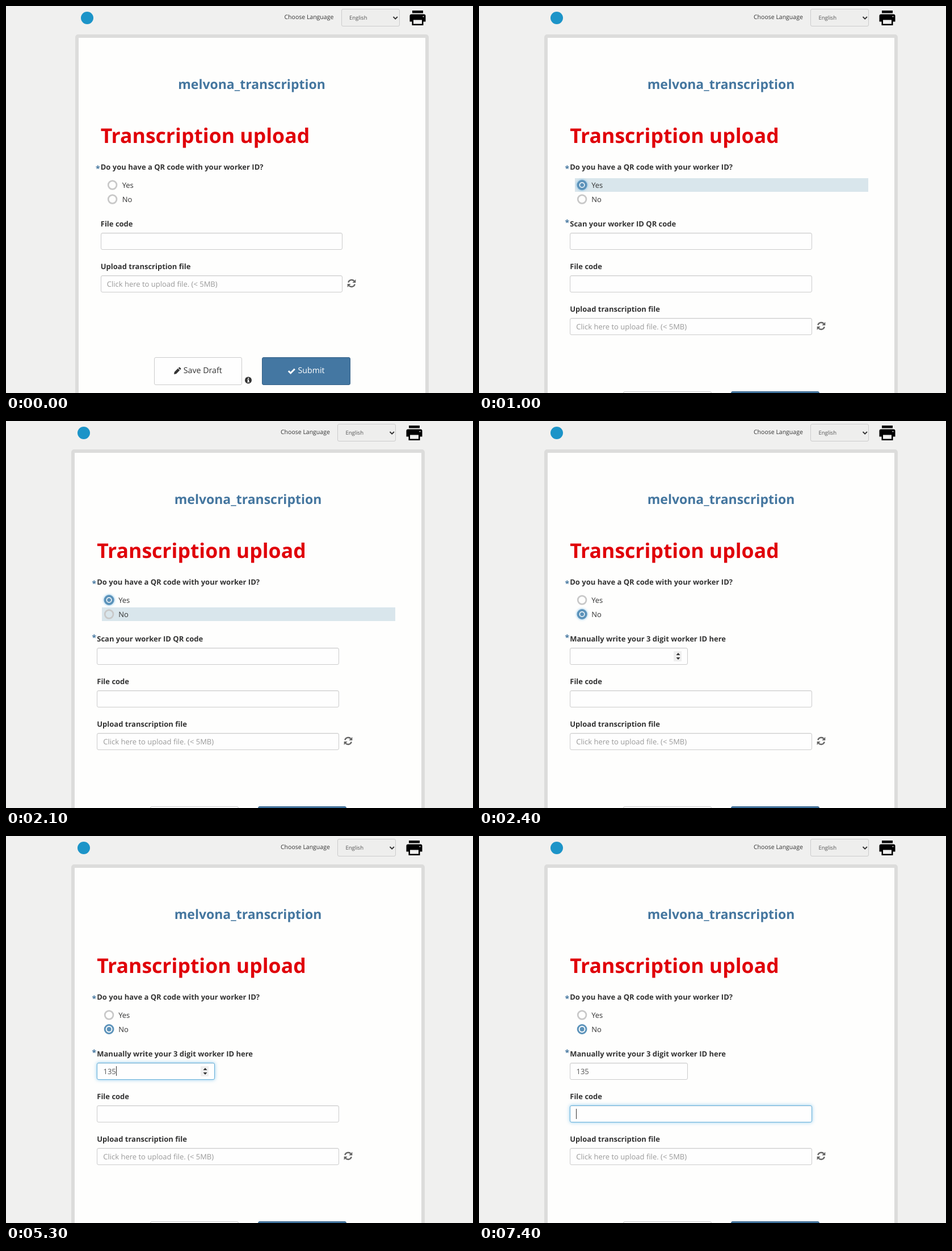
Write an HTML page that moves like this. It is 823 px wide and 681 px high and loops after 8 s.

```html
<!DOCTYPE html>
<html lang="en">
<head>
<meta charset="utf-8">
<title>Transcription upload</title>
<style>
  html, body { margin: 0; width: 100%; height: 100%; overflow: hidden; background: #f0f0ef; }
  body { position: relative; font-family: "Open Sans", sans-serif; color: #333; text-rendering: geometricPrecision; }
  div, span, svg { position: absolute; box-sizing: border-box; }
  #stage, .group { left: 0; top: 0; width: 823px; height: 681px; }
  span { white-space: pre; line-height: normal; }
  svg { left: 0; top: 0; overflow: visible; }
  .card { border: 6px solid #dcdcdb; border-radius: 5px; background: #fefefd; }
  .select { border: 1px solid #ccc; border-radius: 3px; background: #eeeeed; }
  .field {
    --f: 0;
    border: 1px solid color-mix(in srgb, #66afd9 calc(var(--f) * 100%), #ccc);
    border-radius: 3px; background: #fefefe;
    box-shadow: inset 0 1px 1px rgb(0 0 0 / .06), 0 0 6px rgb(82 175 230 / calc(var(--f) * .65));
  }
  .save { border: 1px solid #ccc; border-radius: 3px; background: #fefefe; }
  .submit { border: 1px solid #356187; border-radius: 3px; background: #4477a2; }
  .row { background: #d9e6ec; }
  .caret { background: #333; }
  .spin { background: #efefef; }
</style>
</head>
<body>
<div id="stage"></div>
<script>
const LOOP = 8000, LEFT = 166.75, WIDE = 426.5, BLUE = '#44769f', RADIO = '#5c93ba';
const stage = document.getElementById('stage');

function add(parent, tag, cls, style = {}) {
  const el = document.createElement(tag);
  el.className = cls;
  Object.assign(el.style, style);
  return parent.appendChild(el);
}
const group = parent => add(parent, 'div', 'group');
const box = (parent, cls, x, y, w, h) =>
  add(parent, 'div', cls, { left: x + 'px', top: y + 'px', width: w + 'px', height: h + 'px' });

// Places text by its baseline.
function text(parent, x, baseline, size, str, style = {}) {
  const el = add(parent, 'span', '', {
    left: x + 'px', top: baseline - Math.round(size * 1.069) + 'px', fontSize: size + 'px', ...style });
  el.textContent = str;
  return el;
}
const label = (parent, baseline, str) => text(parent, LEFT, baseline, 13, str, { fontWeight: 700 });
const star = (parent, baseline) => text(parent, 158, baseline, 14, '*', { fontWeight: 700, color: BLUE });
const field = (parent, y, w = WIDE) => box(parent, 'field', LEFT, y, w, 30);

function art(parent, markup) {
  const holder = group(parent);
  holder.innerHTML = `<svg width="823" height="681">${markup}</svg>`;
  return holder;
}
const show = (el, on) => { el.style.visibility = on ? 'inherit' : 'hidden'; };

// Header
art(stage, `
  <circle cx="143" cy="21" r="11" fill="#1c94c8"/>`);
text(stage, 490.5, 24, 10.5, 'Choose Language');
box(stage, 'select', 590.75, 5, 103, 31);
text(stage, 605, 24, 9.5, 'English', { color: '#555' });
art(stage, `
  <path d="M682.5 19l3.7 3.7 3.7-3.7" fill="none" stroke="#333" stroke-width="1.8"/>
  <path d="M716 8h19v4.5h-19z M714 14.5h22.500a3 3 0 0 1 3 3v10h-4v6.500h-20v-6.500h-4v-10a3 3 0 0 1 3-3z" fill="#000"/>
  <path d="M718 24.500h15v7h-15z" fill="#f0f0ef"/>
  <circle cx="735.5" cy="18.500" r="1" fill="#f0f0ef"/>`);

// Form
box(stage, 'card', 121.75, 50, 623, 700);
text(stage, 133, 146, 23, 'melvona_transcription',
  { width: '600px', textAlign: 'center', fontWeight: 700, color: BLUE });
text(stage, LEFT, 242, 35.6, 'Transcription upload', { fontWeight: 700, color: '#e00009' });
star(stage, 292);
label(stage, 288, 'Do you have a QR code with your worker ID?');

function option(name, y) {
  const row = box(stage, 'row', 175.75, y - 12, 517, 24);
  const dot = art(stage, `<circle class="ring" cx="187.6" cy="${y}" fill="none"/>
    <circle class="dot" cx="187.6" cy="${y}" fill="${RADIO}"/>`);
  text(stage, 204.7, y + 5, 13, name);
  const [ring, core] = dot.querySelectorAll('circle');
  return (checked, focused, hover) => {
    show(row, hover);
    ring.setAttribute('r', checked ? (focused ? 7 : 7.4) : 7.4);
    ring.setAttribute('stroke', checked ? RADIO : '#c8c8c8');
    ring.setAttribute('stroke-width', checked ? (focused ? 4 : 3) : 2.7);
    ring.setAttribute('fill', checked ? '#fefefe' : 'none');
    ring.style.filter = focused ? 'drop-shadow(0 0 2px rgb(82 168 225 / .8))' : 'none';
    core.setAttribute('r', checked ? (focused ? 3.5 : 4) : 0);
  };
}
const setYes = option('Yes', 315);
const setNo = option('No', 340);

const extra = group(stage);
star(extra, 387);
const scan = group(extra);
label(scan, 388, 'Scan your worker ID QR code');
field(scan, 399);

const manual = group(extra);
label(manual, 388, 'Manually write your 3 digit worker ID here');
const idField = field(manual, 399, 207.5);
const idText = text(manual, 178, 419, 13, '', { color: '#555' });
const spinner = group(manual);
box(spinner, 'spin', 349.5, 405, 14, 18);
art(spinner, `<path d="M353.500 412l3.500-4 3.500 4z M353.500 416l3.500 4 3.500-4z" fill="#333"/>`);
const idCaret = box(manual, 'caret', 177.5, 405, 1, 17);

const lower = group(stage);
label(lower, 388, 'File code');
const codeField = field(lower, 399);
const codeCaret = box(lower, 'caret', 177.5, 405, 1, 18);
label(lower, 463, 'Upload transcription file');
field(lower, 474);
text(lower, 177.8, 494, 13, 'Click here to upload file. (< 5MB)', { color: '#999' });
art(lower, `
  <g id="arrow">
    <path d="M603.300 486.500a6 6 0 0 1 10.300-2.500" fill="none" stroke="#666" stroke-width="2.400"/>
    <path d="M616.300 481v6h-6z" fill="#666"/>
  </g>
  <use href="#arrow" transform="rotate(180 609 488)"/>`);

const buttons = group(stage);
box(buttons, 'save', 260.6, 617.5, 155.5, 49);
box(buttons, 'submit', 450.6, 617.5, 156, 49);
text(buttons, 312.8, 647, 14.2, 'Save Draft');
text(buttons, 514.5, 647, 14.2, 'Submit', { color: '#fff' });
art(buttons, `
  <path d="M296 648l.8-4 6.200-6.200 3.200 3.200-6.200 6.200z M303.800 637l1-1q.9-.7 1.700 0l1.500 1.500q.7.900 0 1.700l-1 1z" fill="#333"/>
  <path d="M497.800 642.200l3.800 3.800 7.200-7.200" fill="none" stroke="#fff" stroke-width="3"/>
  <circle cx="427" cy="658.500" r="6" fill="#333"/>
  <path d="M426 654.500h2.200v1.800h-2.200z M425 657.300h3.200v3.700h1v1.300h-4.200v-1.300h1v-2.400h-1z" fill="#fff"/>`);

// Each step lists only what changes at that time (ms).
const steps = [
  [0, { pick: '', hover: '', ring: false, idFocus: 0, codeFocus: 0, id: '', caret: '', spin: true }],
  [800, { hover: 'yes' }],
  [1000, { pick: 'yes', ring: true }],
  [1600, { hover: '' }],
  [2100, { hover: 'no' }],
  [2300, { pick: 'no' }],
  [2400, { hover: '' }],
  [2900, { ring: false, idFocus: .35, caret: 'id' }],
  [3000, { idFocus: .85 }],
  [3100, { idFocus: 1 }],
  [4000, { caret: '' }],
  [4100, { caret: 'id' }],
  [4700, { id: '1' }],
  [5000, { id: '13' }],
  [5300, { id: '135' }],
  [5900, { caret: '' }],
  [6200, { idFocus: .5, codeFocus: .4, caret: 'code', spin: false }],
  [6300, { idFocus: .1, codeFocus: .85 }],
  [6400, { idFocus: 0, codeFocus: 1 }],
  [6800, { caret: '' }],
  [7400, { caret: 'code' }],
];

function render(time) {
  const s = {};
  for (const [at, change] of steps) if (at <= time) Object.assign(s, change);
  const open = s.pick !== '';
  stage.style.left = open ? '-6.5px' : '0';
  lower.style.top = open ? '75px' : '0';
  buttons.style.top = open ? '60px' : '0';
  setYes(s.pick === 'yes', s.pick === 'yes' && s.ring, s.hover === 'yes');
  setNo(s.pick === 'no', s.pick === 'no' && s.ring, s.hover === 'no');
  show(extra, open);
  show(scan, s.pick === 'yes');
  show(manual, s.pick === 'no');
  show(spinner, s.spin);
  show(idCaret, s.caret === 'id');
  show(codeCaret, s.caret === 'code');
  idText.textContent = s.id;
  idCaret.style.left = 177.5 + s.id.length * 7.5 + 'px';
  idField.style.setProperty('--f', s.idFocus);
  codeField.style.setProperty('--f', s.codeFocus);
}

const start = performance.now();
function tick() {
  render((performance.now() - start) % LOOP);
  requestAnimationFrame(tick);
}
tick();
</script>
</body>
</html>
```
